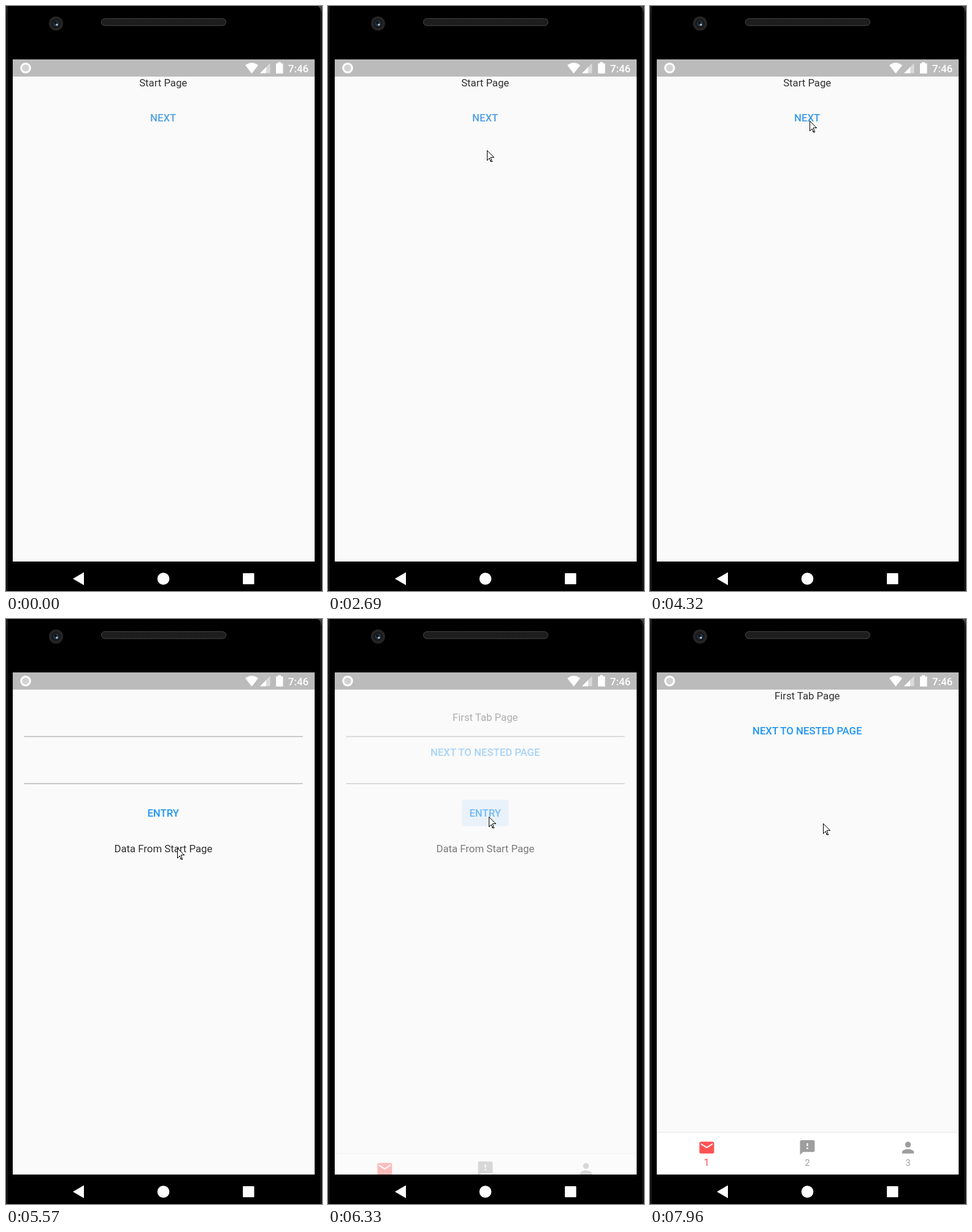
An HTML page that plays this animation: 515 by 953 pixels, repeating every 8000 ms.

```html
<!DOCTYPE html>
<html lang="en">
<head>
<meta charset="utf-8">
<title>Page navigation</title>
<style>
  html, body { margin: 0; width: 100%; height: 100%; overflow: hidden; background: #000; }
  svg { display: block; width: 515px; height: 953px; }
  text { font: 16.76px Roboto, sans-serif; text-anchor: middle; fill: #303030; }
  .button { font-weight: 500; fill: #2196f3; }
  .paper { fill: #fafafa; }
  .white { fill: #fff; }
  .ink { fill: #2196f3; fill-opacity: .13; }
  .tab, .tab text { fill: #9e9e9e; }
  .tab text { font-size: 14.4px; }
  .tab.on, .tab.on text { fill: #ff5252; }
  .tab.on text { font-size: 16.76px; }
</style>
</head>
<body>
<svg viewBox="0 0 515 953">
  <defs>
    <clipPath id="screen"><rect x="11" y="87" width="492" height="818"/></clipPath>
    <pattern id="mesh" width="2" height="2" patternUnits="userSpaceOnUse">
      <rect width="2" height="2" fill="#151515"/>
      <rect width="1" height="1" fill="#363636"/>
    </pattern>
  </defs>

  <!-- Phone body -->
  <rect width="515" height="953" fill="#1d1d1d"/>
  <rect x="3" y="-12" width="509" height="990" rx="14"/>
  <path d="M1.5 10V953M513.5 10V953" stroke="#0c0c0c"/>
  <path d="M508 0Q513 3 514.5 10V0Z" fill="#444"/>
  <circle cx="81.5" cy="28.5" r="11.5" fill="#252525"/>
  <circle cx="81.5" cy="28.5" r="7.5" fill="#171717"/>
  <circle cx="81.5" cy="28.5" r="5" fill="#26323f"/>
  <circle cx="80.5" cy="27" r="2.2" fill="#0b1016"/>
  <circle cx="83" cy="30.5" r="1.7" fill="#a9c4de"/>
  <rect x="155.5" y="20.5" width="203" height="11.5" rx="5.7" fill="url(#mesh)" stroke="#474747"/>

  <!-- Pages -->
  <g clip-path="url(#screen)">
    <g>
      <rect class="paper" x="11" y="87" width="492" height="818"/>
      <circle class="ink" id="nextSplash" cx="260" cy="185"/>
      <text x="256.2" y="131">Start Page</text>
      <text class="button" id="next" x="256.2" y="188">NEXT</text>
    </g>
    <g id="entry">
      <rect class="paper" x="11" y="87" width="492" height="818"/>
      <path d="M29.5 191.6H483.5M29.5 268.200H483.5" stroke="#b8b8b8" stroke-width="1.5"/>
      <rect class="ink" id="press" x="218.500" y="294.500" width="76" height="43" rx="4"/>
      <circle class="ink" id="entrySplash" cx="262" cy="322"/>
      <text class="button" x="256.200" y="322">ENTRY</text>
      <text x="256.400" y="380">Data From Start Page</text>
    </g>
    <g id="tabs">
      <rect class="paper" x="11" y="87" width="492" height="818"/>
      <text x="256.200" y="131">First Tab Page</text>
      <text class="button" x="256.200" y="188">NEXT TO NESTED PAGE</text>
      <rect x="11" y="835.500" width="492" height="1.500" fill="#ececec"/>
      <rect class="white" x="11" y="837" width="492" height="68"/>
      <g class="tab on">
        <path transform="translate(78.1 846.7) scale(1.197)" d="M20 4H4c-1.1 0-2 .9-2 2v12c0 1.1.9 2 2 2h16c1.1 0 2-.9 2-2V6c0-1.1-.9-2-2-2zm0 4l-8 5-8-5V6l8 5 8-5z"/>
        <text x="92.300" y="891">1</text>
      </g>
      <g class="tab">
        <path transform="translate(242.1 846.7) scale(1.197)" d="M20 2H4c-1.1 0-2 .9-2 2v18l4-4h14c1.1 0 2-.9 2-2V4c0-1.1-.9-2-2-2zm-7 12h-2v-2h2zm0-4h-2V6h2z"/>
        <text x="256.500" y="891">2</text>
      </g>
      <g class="tab">
        <path transform="translate(406.1 846.7) scale(1.197)" d="M12 12a4 4 0 1 0 0-8 4 4 0 0 0 0 8zm0 2c-2.7 0-8 1.3-8 4v2h16v-2c0-2.7-5.3-4-8-4z"/>
        <text x="420.500" y="891">3</text>
      </g>
    </g>
  </g>

  <!-- Status bar -->
  <rect x="11" y="87" width="492" height="28" fill="#bbb"/>
  <circle cx="32" cy="101" r="7.3" fill="#d2d2d2" stroke="#fff" stroke-width="3"/>
  <path class="white" d="M390 96.5Q400.5 88.5 411 96.5L400.5 110Z"/>
  <path d="M414 109.5L430.5 93V109.5Z" fill="#dadada"/>
  <path class="white" d="M414 109.5L424 99.5V109.5Z"/>
  <path class="white" d="M443 91.5H448V93.5H451.5V110H440V93.5H443Z"/>
  <text class="button" x="476.5" y="107.5" style="fill:#fff;font-size:17px">7:46</text>

  <!-- System buttons -->
  <path class="white" d="M109 933L127 922.5V943.5Z"/>
  <circle class="white" cx="256.5" cy="933" r="9.8"/>
  <rect class="white" x="386" y="924" width="18.5" height="18" rx="1"/>

  <path id="cursor" d="M.5 .5V16.5L4 13L6.5 18.5H8.5L6.5 12.5V11.5H11.5Z" fill="#fff" stroke="#000" shape-rendering="crispEdges"/>
</svg>
<script>
const LOOP = 8000;
const FRAME = 78; // the screen refreshes in steps of this many ms
const el = id => document.getElementById(id);
const show = (id, on) => el(id).style.display = on ? '' : 'none';
const framesSince = (start, t) => Math.floor((t - start) / FRAME);
const smooth = p => p * p * (3 - 2 * p);

// Pointer moves: start time, number of frames, destination.
const entrance = [503, 290];
const moves = [
  [1360, 6, 243, 196], [1830, 2, 249, 188], [1990, 2, 261, 195],
  [2690, 2, 256, 275], [3080, 4, 262, 193], [3400, 2, 260, 185],
  [4320, 1, 260, 187], [4400, 4, 281, 379], [5570, 5, 262, 322],
  [7030, 4, 261, 629], [7960, 1, 282, 333]
];

function movePointer(t) {
  let [x, y] = entrance;
  for (const [start, frames, toX, toY] of moves) {
    if (t < start) break;
    const p = smooth(Math.min(1, (framesSince(start, t) + 1) / frames));
    x += (toX - x) * p;
    y += (toY - y) * p;
  }
  show('cursor', t >= moves[0][0]);
  el('cursor').setAttribute('transform', `translate(${Math.round(x)} ${Math.round(y)})`);
}

// Page fades in while sliding up; it first shows at the given progress.
function enter(id, start, progress, t) {
  const p = Math.min(1, progress + framesSince(start, t) * FRAME / 300);
  show(id, t >= start);
  if (t < start) return;
  el(id).setAttribute('opacity', p ** 1.7);
  el(id).setAttribute('transform', `translate(0 ${204.5 * (1 - p) ** 2.16})`);
}

function splash(id, start, end, t) {
  show(id, t >= start && t < end);
  el(id).setAttribute('r', t < start + FRAME ? 7 : 12);
}

function draw() {
  const t = performance.now() % LOOP;
  splash('nextSplash', 4010, 4320, t);
  splash('entrySplash', 6110, 6330, t);
  show('press', t >= 6330);
  el('next').style.fill = t < 4320 ? '#53a0e2' : '#3b9bec';
  enter('entry', 4400, .8, t);
  enter('tabs', 6330, .56, t);
  movePointer(t);
  requestAnimationFrame(draw);
}
draw();
</script>
</body>
</html>
```
